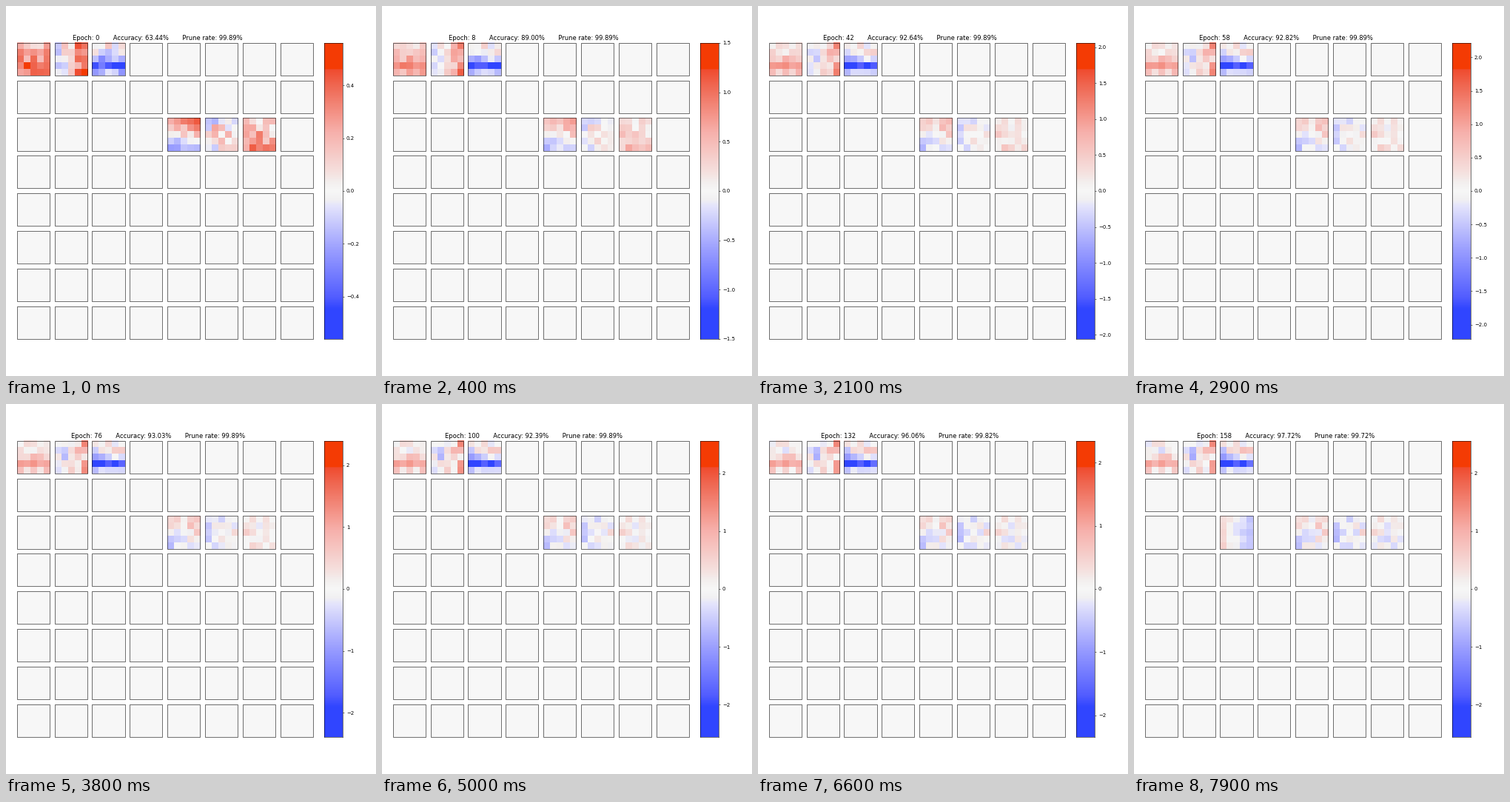
Write a matplotlib script that moves like this. It is 500 by 500 pixels and loops after 8000 ms.

```python
import numpy as np
import matplotlib.pyplot as plt
from matplotlib.animation import FuncAnimation
from matplotlib.collections import PatchCollection
from matplotlib.colors import LinearSegmentedColormap
from matplotlib.patches import Rectangle

FRAMES, INTERVAL = 80, 100
EPOCHS_PER_FRAME = 2
LAST_EPOCH = (FRAMES - 1) * EPOCHS_PER_FRAME

SIZE, GRID = 500, 8
CELL = 400 / (GRID + 0.15 * (GRID - 1))
PITCH = CELL * 1.15
LEFT, TOP = 14.77, 49.77

BLUE, RED, GREY = "#3045ff", "#f43b04", "#f7f7f7"
CMAP = LinearSegmentedColormap.from_list("prune", [
    (0, BLUE), (0.1, BLUE), (0.14, "#525dff"), (0.3, "#9a9eff"),
    (0.45, "#e4e4fc"), (0.47, "#f1f0f2"), (0.5, GREY), (0.53, "#f3efee"),
    (0.56, "#f5e2e0"), (0.7, "#f7b0ab"), (0.86, "#ef6650"),
    (0.91, "#ef4c30"), (0.915, RED), (1, RED)], N=512)

# Training curves as (epoch, value)
LIMIT = [(0, 0.56), (2, 1.0), (8, 1.5), (20, 1.92), (42, 2.06), (76, 2.39),
         (100, 2.556), (132, 2.34), (158, 2.55)]
ACCURACY = [(0, 63.44), (2, 84), (8, 89), (20, 91.4), (42, 92.64),
            (76, 93.03), (100, 92.39), (132, 96.06), (158, 97.72)]
PRUNE_RATE = [(0, 99.89), (112, 99.82), (142, 99.72)]

ROWS, COLS = np.mgrid[0:5, 0:5]
STRIPE = np.exp(-((ROWS - 2.8) / 0.7) ** 2)


def curve(points, epoch):
    return np.interp(epoch, *zip(*points))


def kernel(rng, bias, right=0, down=0, stripe=0, noise=0.2):
    """5x5 weights: tilted plane, horizontal stripe and random grain."""
    plane = bias + right * (COLS - 2) / 2 + down * (ROWS - 2) / 2
    grain = rng.uniform(-1.5, 1.5, (5, 5)) * noise
    return np.clip(plane + stripe * STRIPE + grain, -1, 1)


class Tile:
    def __init__(self, row, col, start, late, born=0):
        rng = np.random.default_rng(10 * row + col)
        self.start, self.late = kernel(rng, **start), kernel(rng, **late)
        self.born = born
        x, y = LEFT + col * PITCH, TOP + row * PITCH
        self.image = stage.imshow(
            self.start, cmap=CMAP, vmin=-1, vmax=1, zorder=2, aspect="auto",
            interpolation="nearest", extent=(x, x + CELL, y + CELL, y))

    def update(self, epoch):
        # Weights move fast at first, then settle
        age = max(epoch - self.born, 0) / (LAST_EPOCH - self.born)
        k = age ** 0.25
        self.image.set_data(self.start + (self.late - self.start) * k)
        self.image.set_visible(epoch >= self.born)


def add_boxes(**style):
    stage.add_collection(PatchCollection(
        [Rectangle((LEFT + c * PITCH, TOP + r * PITCH), CELL, CELL)
         for r in range(GRID) for c in range(GRID)], snap=True, **style))


fig = plt.figure(figsize=(10, 10), dpi=50, facecolor="white")
stage = fig.add_axes([0, 0, 1, 1])
stage.set_axis_off()
add_boxes(facecolor=GREY, edgecolor="none", zorder=1)

tiles = [
    Tile(0, 0, dict(bias=0.5, down=0.15, stripe=0.15, noise=0.15),
         dict(bias=0.03, down=0.08, stripe=0.4, noise=0.13)),
    Tile(0, 1, dict(bias=0.28, right=0.5, noise=0.2),
         dict(bias=0.06, right=0.2, noise=0.22)),
    Tile(0, 2, dict(bias=-0.1, down=-0.2, stripe=-0.7, noise=0.2),
         dict(bias=0.05, right=0.15, stripe=-1, noise=0.18)),
    Tile(2, 4, dict(bias=0.15, right=0.15, down=-0.45, noise=0.1),
         dict(bias=0.03, right=0.08, down=-0.08, noise=0.15)),
    Tile(2, 5, dict(bias=0.12, right=0.1, noise=0.25),
         dict(bias=-0.03, right=0.08, noise=0.13)),
    Tile(2, 6, dict(bias=0.35, right=-0.1, down=0.1, noise=0.2),
         dict(bias=0.02, right=-0.03, down=-0.05, noise=0.13)),
    Tile(2, 2, dict(bias=0, noise=0.02),
         dict(bias=-0.05, right=-0.2, noise=0.05), born=142),
]

add_boxes(facecolor="none", edgecolor="black", linewidth=0.8, zorder=3)
stage.set(xlim=(0, SIZE), ylim=(SIZE, 0))

bar = fig.add_axes([0.86, 0.1, 0.05, 0.8])
ramp = bar.imshow(np.linspace(-1, 1, 512)[:, None], cmap=CMAP, origin="lower",
                  aspect="auto", extent=(0, 1, -1, 1))
bar.set_xticks([])
bar.yaxis.tick_right()

title = fig.text(0.4105, 0.908, "", fontsize=12, ha="center", va="baseline")


def update(i):
    epoch = i * EPOCHS_PER_FRAME
    for tile in tiles:
        tile.update(epoch)

    limit = curve(LIMIT, epoch)
    ramp.set_extent((0, 1, -limit, limit))
    bar.set_ylim(-limit, limit)

    prune = [rate for start, rate in PRUNE_RATE if epoch >= start][-1]
    title.set_text((" " * 7).join([
        f"Epoch: {epoch}",
        f"Accuracy: {curve(ACCURACY, epoch):.2f}%",
        f"Prune rate: {prune:.2f}%"]))
    return []


anim = FuncAnimation(fig, update, frames=FRAMES, interval=INTERVAL,
                     repeat=True, repeat_delay=0)
plt.show()
```
